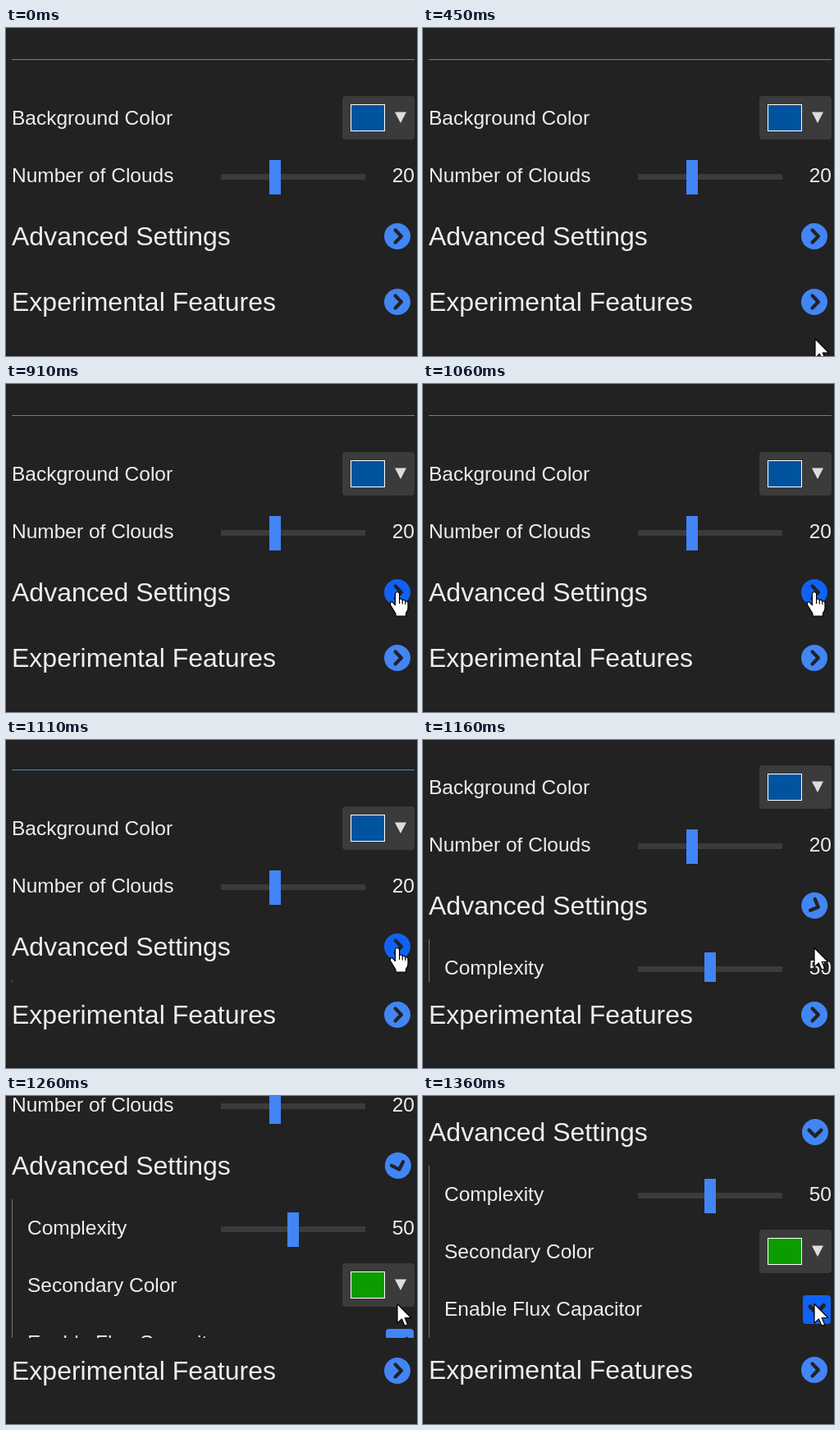
Write an HTML page with a canvas that moves like this. It is 501 px wide and 400 px high and loops after 2.62 s.

```html
<!DOCTYPE html>
<html lang="en">
<head>
<meta charset="utf-8">
<title>Settings panel</title>
<style>
  html, body { margin: 0; width: 100%; height: 100%; overflow: hidden; background: #222; }
  canvas { display: block; }
</style>
</head>
<body>
<canvas id="stage" width="501" height="400"></canvas>
<script>
const ctx = document.getElementById('stage').getContext('2d');
const LOOP = 2620, BODY_HEIGHT = 210, OPEN_START = 1104, OPEN_END = 1360;
const BG = '#222', BLUE = '#4285f4', HOVER = '#0f62f5', GREY = '#3b3b3b', TEXT = '#eee';

// The screen refreshes only at these moments (ms).
const TICKS = [0, 450, 500, 550, 610, 660, 710, 760, 910, 1010, 1060,
  1110, 1160, 1210, 1260, 1310, 1360];

const POINTER = [[450, 478, 379], [660, 480, 282], [760, 477, 253.5]];

const ARROW = new Path2D('M0 0V23.5L5.4 18.4L9 26.8L12.7 25.2L9.2 17H16.8Z');
const HAND = new Path2D(`M-2.6 2Q0-2 2.6 2V9Q5.5 7.5 6.3 10.2Q9 8.8 9.8 11.5
  Q13 10.5 13 14V20Q13 23 10.5 26V29.5H-2V26.5L-8.4 16Q-9.5 11.5-6 12.3L-2.6 16Z`);
const HAND_GAPS = new Path2D('M2.6 9V14M6.3 10.2V14.5M9.8 11.5V15');
const CHEVRON = new Path2D('M-2.4-7.4L4.9 0L-2.4 7.4');
const CHECK = new Path2D('M472 257L479.5 264.5L488.5 255.5');

// CSS "ease", solved by bisection.
function ease(x) {
  let low = 0, high = 1, u = 0.5;
  for (let i = 0; i < 24; i++) {
    u = (low + high) / 2;
    if (0.75 * u * (1 - u) + u ** 3 < x) low = u; else high = u;
  }
  return 0.3 * u * (1 - u) ** 2 + 3 * u * u * (1 - u) + u ** 3;
}

function openAmount(t) {
  if (t < OPEN_START) return 0;
  return t >= OPEN_END ? 1 : ease((t - OPEN_START) / 310);
}

function pointerAt(t) {
  if (t < POINTER[0][0]) return null;
  for (let i = 1; i < POINTER.length; i++) {
    const [t0, x0, y0] = POINTER[i - 1], [t1, x1, y1] = POINTER[i];
    if (t < t1) {
      const k = (t - t0) / (t1 - t0);
      return { x: x0 + (x1 - x0) * k, y: y0 + (y1 - y0) * k };
    }
  }
  const [, x, y] = POINTER[POINTER.length - 1];
  return { x, y };
}

function box(x, y, w, h, color, radius = 0) {
  ctx.fillStyle = color;
  ctx.beginPath();
  ctx.roundRect(x, y, w, h, radius);
  ctx.fill();
}

function text(string, x, y, size = 24.5, align = 'left') {
  ctx.font = `${size}px "Liberation Sans", Arial, sans-serif`;
  ctx.textAlign = align;
  ctx.fillStyle = TEXT;
  ctx.fillText(string, x, y);
}

function strokePath(path, width, color) {
  ctx.lineWidth = width;
  ctx.strokeStyle = color;
  ctx.lineCap = ctx.lineJoin = 'round';
  ctx.stroke(path);
}

function colorRow(label, x, y, color) {
  text(label, x, y + 8);
  box(410, y - 27, 88, 53, GREY, 4);
  box(420, y - 17, 42, 33, '#fff');
  box(421, y - 16, 40, 31, color);
  ctx.fillStyle = '#ddd';
  ctx.fill(new Path2D(`M474 ${y - 7.5}H488L481 ${y + 6}Z`));
}

function sliderRow(label, x, y, thumbX, value) {
  text(label, x, y + 8);
  box(262, y - 2, 176, 7, GREY);
  box(thumbX, y - 19, 14, 42, BLUE);
  text(value, 498, y + 8, 24.5, 'right');
}

function heading(label, y, turn, hovered) {
  text(label, 7, y + 11, 32);
  ctx.save();
  ctx.translate(477.5, y + 0.5);
  ctx.rotate(turn * Math.PI / 2);
  ctx.translate(-0.5, -0.5);
  box(-16, -16, 32, 32, hovered ? HOVER : BLUE, 16);
  strokePath(CHEVRON, 4.3, BG);
  ctx.restore();
}

function sectionBody(top, height, checkHovered) {
  ctx.save();
  ctx.beginPath();
  ctx.rect(0, top, 501, height);
  ctx.clip();
  box(7, top, 1, height, '#777');
  sliderRow('Complexity', 26, top + 35, 343, '50');
  colorRow('Secondary Color', 26, top + 105, '#0b9c00');
  text('Enable Flux Capacitor', 26, top + 183);
  box(463, top + 158, 34, 35, checkHovered ? HOVER : BLUE, 4);
  ctx.translate(0, top - 85);
  strokePath(CHECK, 5, BG);
  ctx.restore();
}

function drawPointer({ x, y }, isHand) {
  ctx.save();
  ctx.translate(x, y);
  const shape = isHand ? HAND : ARROW;
  ctx.fillStyle = '#fff';
  ctx.fill(shape);
  strokePath(shape, 1.2, '#000');
  if (isHand) strokePath(HAND_GAPS, 1.2, '#000');
  ctx.restore();
}

function draw(time) {
  const t = TICKS.findLast(tick => tick <= time);
  const open = openAmount(t);
  const height = Math.floor(open * BODY_HEIGHT);
  const moving = open > 0 && open < 1;
  const advancedY = 254 - height, experimentalY = moving ? 335 : 334;
  const pointer = pointerAt(t);
  const overIcon = y => !!pointer && Math.hypot(pointer.x - 477, pointer.y - y) < 16;
  const overAdvanced = overIcon(advancedY), overExperimental = overIcon(experimentalY);

  box(0, 0, 501, 400, BG);
  box(0, 398, 501, 2, '#1f1f1f');
  box(7, 38 - height, 491, 1, BLUE);
  colorRow('Background Color', 7, 110 - height, '#00539f');
  sliderRow('Number of Clouds', 7, 180 - height, 321, '20');
  heading('Advanced Settings', advancedY, open, overAdvanced);
  if (height > 0) sectionBody(295 - height, height, open === 1);
  heading('Experimental Features', experimentalY, 0, overExperimental);
  if (pointer) drawPointer(pointer, overAdvanced || overExperimental);
}

const start = performance.now();
function frame() {
  draw((performance.now() - start) % LOOP);
  requestAnimationFrame(frame);
}
frame();
</script>
</body>
</html>
```
